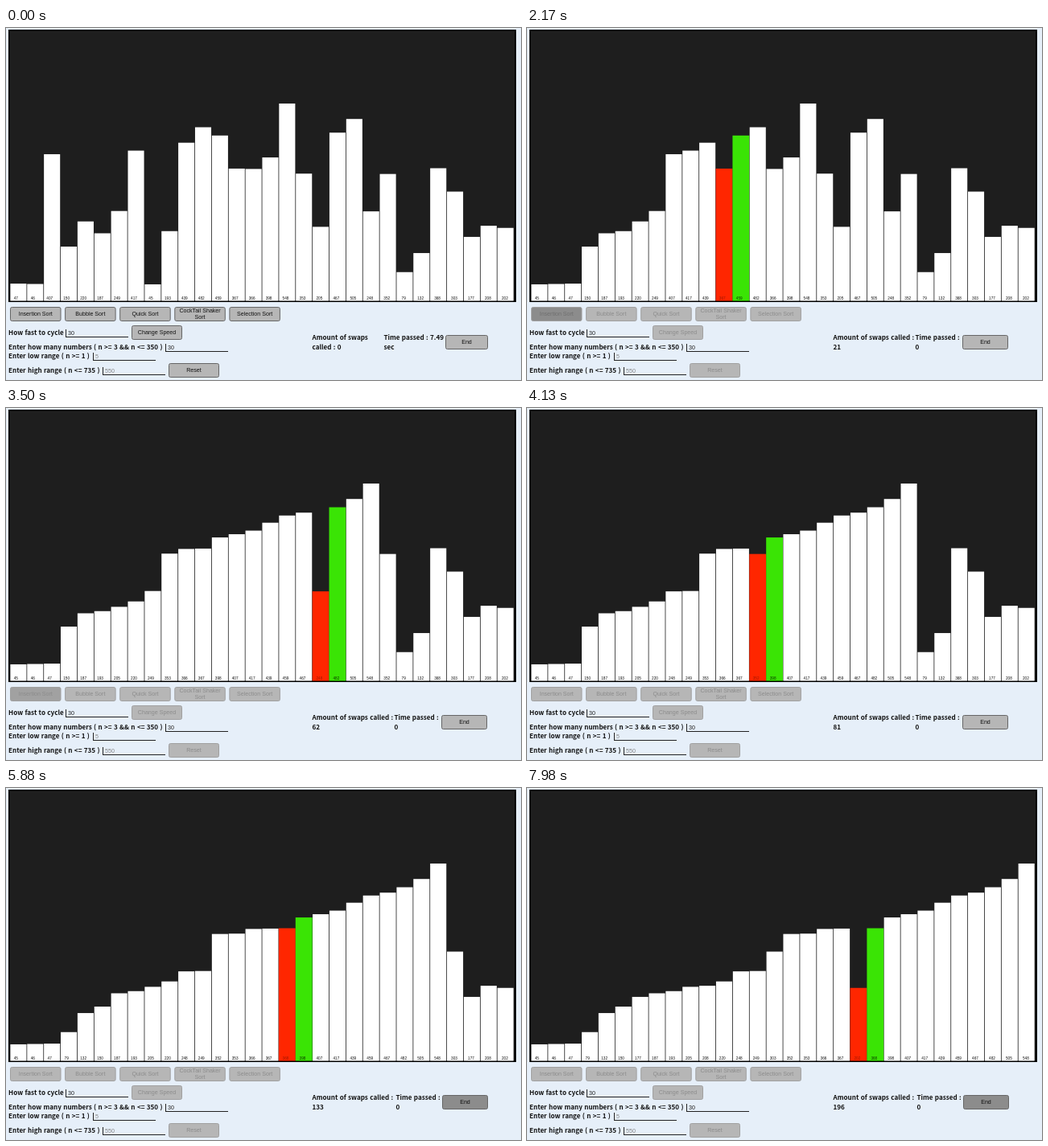
Animation, 640 px wide and 438 px high, one loop 8000 ms. Source, as an HTML page with a canvas:

```html
<!DOCTYPE html>
<html lang="en">
<head>
<meta charset="utf-8">
<title>Insertion sort</title>
<style>
html, body { margin: 0; width: 100%; height: 100%; overflow: hidden; background: #e6eff9; }
canvas { display: block; }
</style>
</head>
<body>
<canvas id="stage" width="640" height="438"></canvas>
<script>
const ctx = document.getElementById('stage').getContext('2d');
const LOOP = 8000, TICK = 70, START = 1400;
const PITCH = 20.87, BASE = 339.1;
const LABEL = 'bold 8.1px "Noto Sans CJK JP", "Noto Sans", sans-serif';
const CONTROL = '7.1px "Liberation Sans", Arial, sans-serif';
const DIGITS = '4.7px "Liberation Sans", Arial, sans-serif';
const values = [47, 46, 407, 150, 220, 187, 249, 417, 45, 193, 439, 482, 459, 367, 366,
  398, 548, 353, 205, 467, 505, 248, 352, 79, 132, 368, 303, 177, 208, 202];

// Swap count over time: nearly 30 swaps a second
const pace = [[1420, 0], [2170, 21.5], [2800, 40.5], [4130, 81.5], [5880, 133.5], [7000, 166.5], [7980, 196.5]];

function swapsAt(t) {
  if (t <= pace[0][0]) return 0;
  const k = Math.max(1, pace.findIndex(p => p[0] >= t));
  const [[t0, n0], [t1, n1]] = [pace[k - 1], pace[k]];
  return Math.floor(n0 + (n1 - n0) * (t - t0) / (t1 - t0));
}

// The list after a number of swaps, with the index of the moving value
function sortFor(limit) {
  const list = [...values];
  let swaps = 0;
  for (let i = 1; i < list.length; i++) {
    for (let j = i; j > 0 && list[j - 1] > list[j]; j--) {
      if (limit === 0) return { list, active: -1 };
      [list[j - 1], list[j]] = [list[j], list[j - 1]];
      if (++swaps === limit) return { list, active: j - 1 };
    }
  }
  return { list, active: -1 };
}

const ramp = (t, from, length = 280) => Math.min(1, Math.max(0, (t - from) / length));

function text(str, x, y, font = LABEL, color = '#111', align = 'left') {
  ctx.font = font;
  ctx.wordSpacing = font === LABEL ? '0.5px' : '0px';
  ctx.fillStyle = color;
  ctx.textAlign = align;
  ctx.fillText(str, x, y);
}

function button(label, x, y, w, disabled, hover = 0) {
  const h = 18, shade = Math.round(182 - 42 * hover);
  ctx.beginPath();
  ctx.roundRect(x + .5, y + .5, w - 1, h - 1, 2);
  ctx.fillStyle = `rgb(${shade},${shade},${shade})`;
  ctx.fill();
  ctx.lineWidth = 1;
  ctx.strokeStyle = disabled ? '#a0a0a0' : '#666';
  ctx.stroke();
  const ink = disabled ? (hover > .5 ? '#707070' : '#8c8c8c') : '#111';
  const lines = label.split('\n');
  lines.forEach((line, i) =>
    text(line, x + w / 2, y + h / 2 + 2.1 + (i - (lines.length - 1) / 2) * 8, CONTROL, ink, 'center'));
}

function field(label, y, x, value, color) {
  text(label, 3, y + 3);
  ctx.fillStyle = '#222';
  ctx.fillRect(x, y - 4, 1, 9);
  ctx.fillRect(x, y + 5, 78, 1);
  text(value, x + 3, y + 3, CONTROL, color);
}

function drawBars({ list, active }) {
  ctx.fillStyle = '#000';
  ctx.fillRect(3, 2, 631, 339);
  ctx.fillStyle = '#1e1e1e';
  ctx.fillRect(5, 4, 627, 335);
  list.forEach((v, i) => {
    const red = i === active, green = active >= 0 && i === active + 1;
    const inset = red || green ? 0 : .4;
    const height = v * .4473;
    ctx.fillStyle = red ? '#ff2600' : green ? '#3ae405' : '#fff';
    ctx.fillRect(5 + i * PITCH + inset, BASE - height, PITCH - 2 * inset, height + .4);
    text(v, 12.3 + i * 20.95, 337.8, DIGITS, red ? '#a01800' : green ? '#0a3a00' : '#111', 'center');
  });
}

function draw(t) {
  const running = t >= START;
  const count = swapsAt(t);
  ctx.fillStyle = '#e6eff9';
  ctx.fillRect(0, 0, 640, 438);
  drawBars(sortFor(count));

  const sortHover = ramp(t, 70) - ramp(t, 3360);
  ['Insertion Sort', 'Bubble Sort', 'Quick Sort', 'CockTail Shaker\nSort', 'Selection Sort']
    .forEach((name, i) => button(name, 5 + 68.1 * i, 347, 63.5, running, i ? 0 : sortHover));

  field('How fast to cycle', 379, 74, '30', '#222');
  field('Enter how many numbers ( n >= 3 && n <= 350 )', 397, 198, '30', '#222');
  field('Enter low range ( n >= 1 )', 408, 108, '5', '#888');
  field('Enter high range ( n <= 735 )', 426, 120, '550', '#888');
  button('Change Speed', 156, 370, 63, running);
  button('Reset', 202, 417, 63, running);

  if (running) {
    const shift = count > 99 ? 1 : 0;
    text('Amount of swaps called :', 380.5, 388);
    text(count, 380.5, 400);
    text('Time passed :', 482.5 + 2 * shift, 388);
    text('0', 482.5 + 2 * shift, 400);
    button('End', 541 + shift, 382, 57, false, ramp(t, 4480));
  } else {
    text('Amount of swaps', 380.5, 388);
    text('called : 0', 380.5, 400);
    text('Time passed : 7.49', 469.5, 388);
    text('sec', 469.5, 400);
    button('End', 546, 382, 53, false);
  }
}

const origin = performance.now();
function frame() {
  const t = (performance.now() - origin) % LOOP;
  draw(Math.floor(t / TICK) * TICK);
  requestAnimationFrame(frame);
}
frame();
</script>
</body>
</html>
```
